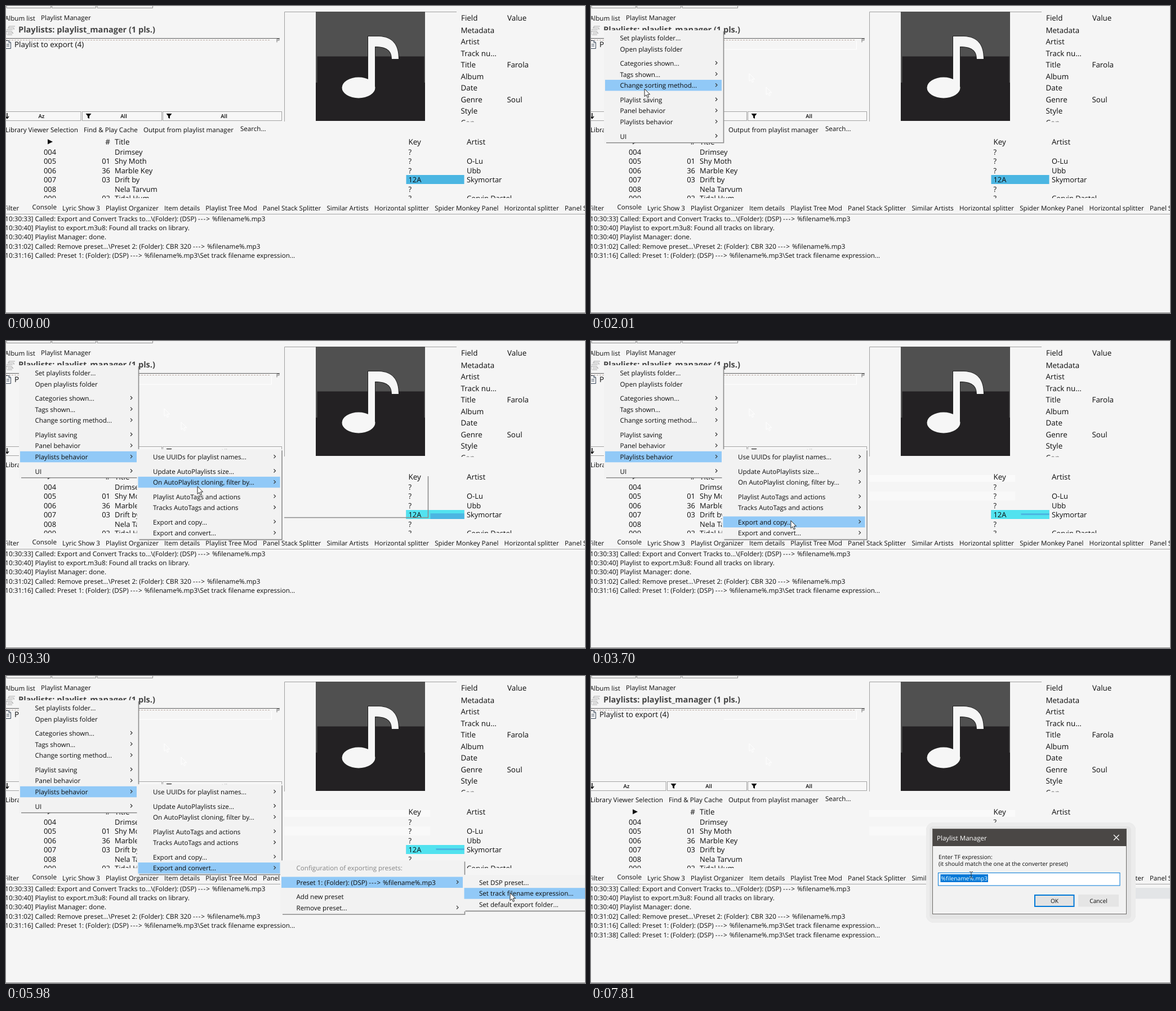
An HTML page that plays this animation: 1028 by 545 pixels, repeating every 8000 ms.

```html
<!DOCTYPE html>
<html lang="en">
<head>
<meta charset="utf-8">
<title>Playlist export menu</title>
<style>
  html, body { margin: 0; width: 100%; height: 100%; overflow: hidden; background: #f5f5f5; }
  svg { display: block; width: 1028px; height: 545px; }
  text {
    font-family: "Open Sans", "Noto Sans", sans-serif;
    font-size: 11.6px; fill: #0c0c0c;
    text-rendering: geometricPrecision; white-space: pre;
  }
  .list { font-size: 13.4px; }
  .row { font-size: 12.9px; }
  .log { font-size: 11.68px; }
  .head { font-size: 14.55px; font-weight: 700; fill: #444; }
  .btn { font-size: 9.5px; font-weight: 600; text-anchor: middle; }
  .dlg { font-size: 10.2px; }
  .mid { text-anchor: middle; }
  .end { text-anchor: end; }
  .off { fill: #858585; }
  .inv { fill: #fff; }
</style>
</head>
<body>
<svg id="stage" viewBox="0 0 1028 545"></svg>
<script>
const LOOP = 8000;
const OPEN = 1550, CLOSE = 6790, POPUP = 6870;
const stage = document.getElementById('stage');

function el(tag, attrs = {}, parent = stage) {
  const node = document.createElementNS('http://www.w3.org/2000/svg', tag);
  for (const key in attrs) node.setAttribute(key, attrs[key]);
  parent.appendChild(node);
  return node;
}
const group = (parent, attrs) => el('g', attrs, parent);
const box = (x, y, width, height, fill, parent, more) =>
  el('rect', { x, y, width, height, fill, ...more }, parent);
const path = (d, stroke, parent, more) =>
  el('path', { d, stroke, fill: 'none', ...more }, parent);

// Arrows made of hyphens are set a little wider than the text around them.
function label(x, y, str, cls = '', parent) {
  const node = el('text', { x, y, class: cls }, parent);
  for (const part of str.split(/(--->)/)) {
    const span = el('tspan', part === '--->' ? { 'letter-spacing': 1 } : {}, node);
    span.textContent = part;
  }
  return node;
}

function tabs(x, y, names) {
  for (const name of names) x += label(x, y, name).getComputedTextLength() + 10.1;
}

function clipped(id, height) {
  box(0, 0, 1028, height, '#000', el('clipPath', { id }));
  return group(stage, { 'clip-path': `url(#${id})` });
}

const clamp = v => Math.max(0, Math.min(1, v));
const timed = [];
function during(node, from, to = LOOP, fade = 0) {
  timed.push({ node, from, to, fade });
  return node;
}

// Playlist panel
path('M1 0V3.5H79.5V0M81.5 0V3.5H159.5V0M162 0V3.5H260.5V0', '#8d8d8d');
label(-2, 26, 'Album list');
label(62, 24.5, 'Playlist Manager');
path('M5 36H16M3 39H14M1 42H12M0 51V45H10L13 49M3 48H12M2 51H11M5 36V39M14 39V42', '#a5a5a5');
label(22, 47, 'Playlists: playlist_manager (1 pls.)', 'head');
path('M0 57.5H486', '#5d5d5d');
path('M0 60.5H468', '#b9a8a0', stage, { 'stroke-dasharray': '3 2' });
path('M481 64.5V58.5H485V61H481', '#777');
path('M-2 61.5H5L8.5 65V75.5H-2M5 61.5V65H8.5M1 68H6M1 71H6', '#3c4a5c');
label(15, 73, 'Playlist to export (4)', 'list');

function filterButton(x, w, textX, name, icon) {
  box(x, 187.5, w, 16, '#f7f7f7', stage, { stroke: '#a3a3a3' });
  if (icon) el('path', { d: `M${x + 6} 191h10l-3.5 4.5v4.500l-3 -1.500v-3Z`, fill: '#111' });
  label(textX, 199, name, 'btn');
}
filterButton(-3, 136, 63, 'Az');
filterButton(135.5, 141, 209, 'All', true);
filterButton(278.5, 211, 387, 'All', true);
path('M2 190V199M-1 196L2 199.5L5 196', '#111', stage, { 'stroke-width': 1.5 });

// Cover placeholder
path('M494.5 205V10.5H800', '#a0a0a0');
box(550, 10, 194, 194, '#505050');
box(552.5, 89.5, 190, 46.5, '#232123');
box(550, 136, 194, 68, '#232123');
el('path', {
  d: 'M643 54H662C686 55 697 68 697 94H685C685 79 676 72 655 72V146H643Z' +
     'M596.5 145a29.5 18.5 0 1 1 59 0a29.5 18.5 0 1 1 -59 0Z',
  fill: '#f6f6f6', stroke: '#222', 'stroke-width': 2, 'paint-order': 'stroke'
});

// Track details
const fields = clipped('fieldClip', 205.5);
label(808, 25.5, 'Field', 'list', fields);
label(890, 25.5, 'Value', 'list', fields);
const values = { Title: 'Farola', Genre: 'Soul' };
['Metadata', 'Artist', 'Track nu...', 'Title', 'Album', 'Date', 'Genre', 'Style', 'Con']
  .forEach((name, i) => {
    const y = 47.7 + i * 20.5;
    label(807.5, y, name, 'list', fields);
    label(889.5, y, values[name] || '', 'list', fields);
  });

tabs(-1, 224, ['Library Viewer Selection', 'Find & Play Cache', 'Output from playlist manager']);
label(416, 222, 'Search...');

const bands = during(group(), 3700);
box(494, 238, 259, 12, '#fafafa', bands);
box(494, 267, 259, 16, '#f9f9f9', bands);

// Track list
const tracks = clipped('trackClip', 341);
el('path', { d: 'M74 236.5L83 241L74 245.5Z', fill: '#111' }, tracks);

function trackRow(y, cls, [id, num, title, key, artist]) {
  label(67, y, id, cls, tracks);
  label(185, y, num, cls + ' end', tracks);
  label(193, y, title, cls, tracks);
  label(714.5, y, key, cls, tracks);
  label(818, y, artist, cls, tracks);
}
const cell = (dx, dy, w, h, fill) => box(710.5 + dx, 300 + dy, w, h, fill, tracks);
cell(0, 0, 103, 16, '#4bb6e2');
during(cell(0, 0, 103, 16, '#52e2ef'), 3240, POPUP);
during(cell(43, 6, 60, 10, '#4bb6e2'), 3240, 3700);
during(cell(53, 6, 50, 3, '#4bb6e2'), 3700, POPUP);
during(cell(0, 0, 103, 16, '#9fdce9'), POPUP);
during(cell(0, 0, 103, 2.5, '#3fc0c6'), POPUP);

trackRow(246, 'list', ['', '#', 'Title', 'Key', 'Artist']);
[
  ['004', '', 'Drimsey', '?', ''],
  ['005', '01', 'Shy Moth', '?', 'O-Lu'],
  ['006', '36', 'Marble Key', '?', 'Ubb'],
  ['007', '03', 'Drift by', '12A', 'Skymortar'],
  ['008', '', 'Nela Tarvum', '?', ''],
  ['009', '02', 'Tidal Hum', '?', 'Corvin Dastel']
].forEach((cells, i) => trackRow(264 + i * 16.45, 'row', cells));

// Lower tabs and console
label(-4, 362.5, 'Filter');
label(46.5, 361, 'Console');
tabs(100, 362.5, [
  'Lyric Show 3', 'Playlist Organizer', 'Item details', 'Playlist Tree Mod',
  'Panel Stack Splitter', 'Similar Artists', 'Horizontal splitter',
  'Spider Monkey Panel', 'Horizontal splitter', 'Panel Stack Splitter'
]);
path('M0 369.5H1028', '#a6a6a6');
path('M0 544.5H1028', '#8a8a8a');
const preset = 'Preset 1: (Folder): (DSP) ---> %filename%.mp3';
const setName = 'Set track filename expression...';
const log = [
  '[10:30:33] Called: Export and Convert Tracks to...\\(Folder): (DSP) ---> %filename%.mp3',
  '[10:30:40] Playlist to export.m3u8: Found all tracks on library.',
  '[10:30:40] Playlist Manager: done.',
  '[10:31:02] Called: Remove preset...\\Preset 2: (Folder): CBR 320 ---> %filename%.mp3',
  `[10:31:16] Called: ${preset}\\${setName}`,
  `[10:31:38] Called: ${preset}\\${setName}`
].map((line, i) => label(-5.5, 381.5 + i * 16.45, line, 'log'));
during(log.pop(), CLOSE);

// Faint traces left by the pointer
const ARROW = 'M0 0V13.5L3.1 10.7L5.3 15.5L7.5 14.5L5.4 9.8H9.6Z';
for (const [x, y] of [[281, 120], [311, 144]])
  during(path(ARROW, '#fff', stage, { transform: `translate(${x} ${y})` }), 700);
during(path('M236 77H471.5V62', '#fff'), 800);

// Menus: each one opens beside a row of its parent. '-' is a separator, '>' marks a submenu.
const ROW = 19.65, GAP = 5.8, PAD = 13.4;
const menus = [];

function panel(x, y, w, h, parent, fill = '#f2f2f2') {
  box(x, y, w, h, fill, parent);
  path(`M${x + w - .5} ${y + 2}V${y + h - .5}H${x + 4}`, '#8c8c8c', parent, { 'stroke-width': 1.6 });
}

function menu(open, w, items, parentRow) {
  const parent = menus[menus.length - 1];
  const x = parent ? parent.x + parent.w - 3.5 : 23;
  const y = parent ? parent.rows[parentRow].cy - PAD : 43;
  const rows = [];
  let cy = y + PAD;
  for (const item of items) {
    if (item === '-') { cy += GAP; continue; }
    rows.push({ cy, sub: item.endsWith('>'), off: item.endsWith(':'), name: item.replace(/>$/, '') });
    cy += ROW;
  }
  const h = cy - ROW + 12.3 - y;
  const g = during(group(), open, CLOSE, 70);
  panel(x, y, w, h, g);
  const mark = box(x + 2, 0, w - 6, 19.5, '#91c9f7', g);
  for (const { cy, sub, off, name } of rows) {
    label(x + 28.5, cy + 4.5, name, off ? 'off' : '', g);
    if (sub) path(`M${x + w - 15} ${cy - 3.5}l3 3l-3 3`, '#333', g, { 'stroke-width': 1.2 });
  }
  menus.push({ open, x, y, w, h, rows, mark, parentRow });
}

menu(OPEN, 213, [
  'Set playlists folder...', 'Open playlists folder', '-',
  'Categories shown...>', 'Tags shown...>', 'Change sorting method...>', '-',
  'Playlist saving>', 'Panel behavior>', 'Playlists behavior>', '-', 'UI>'
]);
menu(2490, 258, [
  'Use UUIDs for playlist names...>', '-',
  'Update AutoPlaylists size...>', 'On AutoPlaylist cloning, filter by...>', '-',
  'Playlist AutoTags and actions>', 'Tracks AutoTags and actions>', '-',
  'Export and copy...>', 'Export and convert...>'
], 7);

const brief = during(group(), 3290, 3480);
panel(490, 238, 260, 76, brief, 'none');
during(box(490, 238, 259, 75.5, '#f2f2f2', brief), 3310, 3480, 70);

menu(3840, 328, [
  'Configuration of exporting presets:', '-', preset + '>', '-', 'Add new preset', 'Remove preset...>'
], 6);
menu(4790, 240, ['Set DSP preset...', setName, 'Set default export folder...'], 1);

// Row under the pointer, or the row whose submenu holds the pointer
function hoveredRow(i, t, x, y) {
  const m = menus[i];
  const deeper = menus[i + 1];
  if (deeper && t >= deeper.open && x >= deeper.x) return m.rows[deeper.parentRow];
  if (x < m.x || x > m.x + m.w) return null;
  return m.rows.find(r => !r.off && Math.abs(r.cy - y) < ROW / 2);
}

// Dialog
during(box(813, 376, 215, 19.5, '#e3e5e7'), CLOSE);
const dialog = group();
const veil = during(group(dialog), POPUP);
box(595, 260, 372, 178, '#5a6870', veil, { rx: 14, opacity: .15 });
box(608, 341, 342, 80, '#fff', veil, { opacity: .6 });
const pane = during(group(dialog), POPUP, LOOP, 260);
box(595, 260, 372, 178, '#ececec', pane, { rx: 14 });
box(601, 267, 358, 164, '#e4e4e4', pane, { rx: 6 });
const frame = during(group(pane), POPUP + 50, LOOP, 150);
box(606.5, 271.5, 344, 151, '#f2f2f2', frame, { stroke: '#6b6967' });
box(607, 272, 343.5, 30, '#4a4745', frame);
label(614, 291.5, 'Playlist Manager', 'inv', frame);
path('M928 282l9.5 9.5m0 -9.5l-9.5 9.5', '#fff', frame, { 'stroke-width': 1.3 });
label(617, 324.5, 'Enter TF expression:', 'dlg', pane);
label(617, 337, '(it should match the one at the converter preset)', 'dlg', pane);
box(616.5, 349.5, 322.5, 22.5, '#fff', pane, { stroke: '#0078d7' });
box(620.5, 352, 84.5, 14, '#0078d7', pane);
label(621.5, 362.8, '%filename%.mp3', 'dlg inv', pane);
box(788, 389, 69.5, 20, '#e3e3e3', pane, { stroke: '#0078d7', 'stroke-width': 2 });
label(823, 403, 'OK', 'dlg mid', pane);
box(865, 388, 72, 21.5, '#e5e5e5', pane);
label(901, 403, 'Cancel', 'dlg mid', pane);

// Chosen entry lingers while the menus close
const chosen = during(group(), CLOSE, 7000);
box(813, 377, 215, 18.5, '#5a6870', chosen, { opacity: .08 });
box(943, 377, 8, 18.5, '#8fdbe9', chosen);
label(841, 391, setName, '', chosen);

// Pointer: time, x, y
const route = [
  [70, 703, 396], [560, 311, 144], [830, 265, 122], [1220, 20, 43], [OPEN, 20, 43],
  [2010, 95, 147], [2430, 121, 201], [2910, 121, 201], [3300, 340, 258], [3840, 360, 340],
  [4500, 569, 356], [4890, 630, 361], [5030, 630, 361], [5500, 826, 366], [5980, 895, 385],
  [6910, 895, 385], [7190, 796, 306], [7530, 719, 352], [7810, 675, 353]
];
const arrow = during(el('path', {
  d: ARROW, fill: '#fff', stroke: '#222', 'stroke-linejoin': 'round'
}), 70, 7530);
const beam = during(path('M-3 -5.5H-1L0 -4.5L1 -5.5H3M0 -4.5V4.5M-3 5.5H-1L0 4.5L1 5.5H3', '#333'), 7530);

function pointAt(t) {
  const next = route.find(p => p[0] > t) || route[route.length - 1];
  const [t1, x1, y1] = next;
  const [t0, x0, y0] = route[Math.max(0, route.indexOf(next) - 1)];
  const k = t1 > t0 ? clamp((t - t0) / (t1 - t0)) : 0;
  return [x0 + (x1 - x0) * k, y0 + (y1 - y0) * k];
}

function draw(t) {
  for (const { node, from, to, fade } of timed) {
    node.style.visibility = t >= from && t < to ? 'inherit' : 'hidden';
    if (fade) node.style.opacity = clamp((t - from) / fade);
  }
  const [x, y] = pointAt(t);
  menus.forEach(({ mark }, i) => {
    const row = hoveredRow(i, t, x, y);
    mark.style.visibility = row ? 'inherit' : 'hidden';
    if (row) mark.setAttribute('y', row.cy - 9.75);
  });
  for (const node of [arrow, beam]) node.setAttribute('transform', `translate(${x} ${y})`);
  const s = .96 + .04 * clamp((t - POPUP) / 200);
  dialog.setAttribute('transform', `translate(778 347) scale(${s}) translate(-778 -347)`);
}

const start = performance.now();
function tick() {
  draw((performance.now() - start) % LOOP);
  requestAnimationFrame(tick);
}
tick();
</script>
</body>
</html>
```
